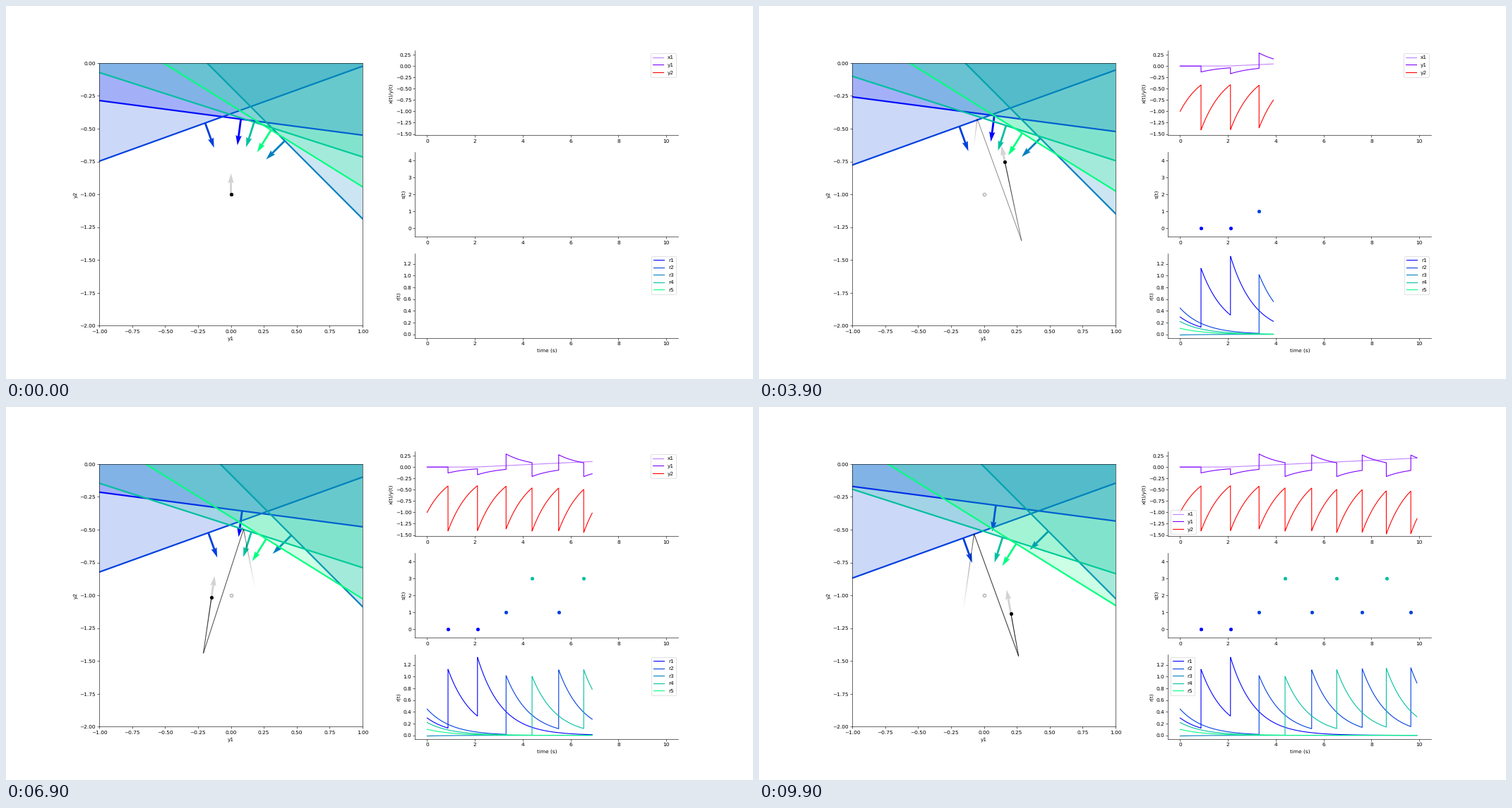
These frames come from a looping animation (1058x529 px, 10000 ms). A matplotlib script:

```python
import numpy as np
import matplotlib.pyplot as plt
from matplotlib.animation import FuncAnimation
from matplotlib.collections import LineCollection

plt.rcParams["font.family"] = "DejaVu Sans"
plt.rcParams["text.hinting"] = "none"

FRAMES, STEP = 100, 100            # simulation steps per frame
DT = 0.001
TRAIL, STRIDE = 1000, 10           # fading trail: one second of history
ANGLES = np.radians([-7.5, 19.85, -45.1, -17.8, -31.9])
D = np.array([np.sin(ANGLES), -np.cos(ANGLES)])    # decoder, one column per neuron
SIGNS = np.array([1, -1, 1, -1, -1])               # input weight of each neuron
THRESH = 1 / np.sqrt(3)
CENTER = np.array([0.0, -1.0])
COLORS = plt.cm.winter(np.linspace(0, 1, 5))
PURPLE, RED = plt.cm.rainbow([0.0, 1.0])


def distances(x):
    """Distance of every boundary from the centre for input x."""
    return THRESH * (1 + SIGNS * x)


def simulate():
    """Leaky network: a neuron fires when the output crosses its boundary."""
    n = FRAMES * STEP
    t = np.arange(n) * DT
    x = 0.2 * np.clip(t - 2, 0, None) / 8
    r = np.zeros((n, 5))
    r[0] = np.linalg.pinv(D) @ CENTER
    spikes = []
    decay = np.exp(-DT)
    for k in range(1, n):
        r[k] = r[k - 1] * decay
        excess = -(D.T @ (D @ r[k] - CENTER)) - distances(x[k])
        i = int(np.argmax(excess))
        if excess[i] > 0:
            r[k, i] += 1
            spikes.append((k, i))
    return t, x, r, r @ D.T, spikes


t, x, r, y, spikes = simulate()

fig = plt.figure(figsize=(20, 10), dpi=52.9)

# Output space
ax = fig.add_subplot(1, 2, 1)
ax.set_aspect("equal")
ax.set(xlabel="y1", ylabel="y2")

leak = ax.quiver([0], [-1], [0], [1], color="lightgray", scale=12.5, zorder=1.5)
edges, areas, arrows = [], [], []
for i, c in enumerate(COLORS):
    z = 2 + 0.08 * i
    edges.append(ax.plot([], [], color=c, lw=3, zorder=z)[0])
    arrows.append(ax.quiver([0], [0], [D[0, i]], [D[1, i]], color=[c],
                            scale=10, zorder=z + 0.02))
    areas.append(ax.fill([0, 1, 1], [0, 0, 1], color=c, alpha=0.2, lw=0,
                         zorder=z + 0.04)[0])
ax.plot(*CENTER, "o", mfc="white", mec="gray", mew=1, ms=6, zorder=3)
trail = LineCollection([], linewidths=1.5, zorder=4)
ax.add_collection(trail)
dot, = ax.plot([], [], "o", color="black", ms=6, zorder=5)
ax.set_xlim(-1, 1)
ax.set_ylim(-2, 0)


# Time courses
def time_axes(row, label, ylim):
    a = fig.add_subplot(3, 2, 2 * row)
    a.spines[["top", "right"]].set_visible(False)
    a.set(xlim=(-0.5, 10.5), ylim=ylim, ylabel=label)
    return a


ax_y = time_axes(1, "x(t)/y(t)", (-1.527, 0.338))
ax_s = time_axes(2, "s(t)", (-0.5, 4.5))
ax_r = time_axes(3, "r(t)", (-0.062, 1.375))
ax_r.set_xlabel("time (s)")

curves = [
    (ax_y.plot([], [], color=PURPLE, alpha=0.5, label="x1")[0], x),
    (ax_y.plot([], [], color=PURPLE, label="y1")[0], y[:, 0]),
    (ax_y.plot([], [], color=RED, label="y2")[0], y[:, 1]),
]
for i, c in enumerate(COLORS):
    curves.append((ax_r.plot([], [], color=c, label=f"r{i + 1}")[0], r[:, i]))
marks = [ax_s.plot([], [], "o", color=c, ms=6)[0] for c in COLORS]
ax_y.legend(loc="best")
ax_r.legend(loc="best")


def draw_boundaries(k):
    for i, d in enumerate(distances(x[k])):
        foot = CENTER - d * D[:, i]
        slope = -D[0, i] / D[1, i]
        xs = np.array([-1.2, 1.2])
        ys = foot[1] + slope * (xs - foot[0])
        edges[i].set_data(xs, ys)
        areas[i].set_xy([(xs[0], ys[0]), (xs[1], ys[1]), (1.2, 2), (-1.2, 2)])
        arrows[i].set_offsets([foot])


def draw_trail(k):
    idx = np.arange(max(0, k - TRAIL), k + 1, STRIDE)
    pts = y[idx]
    trail.set_segments(list(np.stack([pts[:-1], pts[1:]], axis=1)))
    rgba = np.zeros((len(idx) - 1, 4))
    rgba[:, 3] = 1 - (k - idx[1:]) / TRAIL
    trail.set_color(rgba)


def update(frame):
    k = frame * STEP
    draw_boundaries(k)
    draw_trail(k)
    dot.set_data([y[k, 0]], [y[k, 1]])
    leak.set_offsets([y[k]])
    leak.set_UVC([-y[k, 0]], [-y[k, 1]])
    for line, data in curves:
        line.set_data(t[:k + 1], data[:k + 1])
    for i, m in enumerate(marks):
        times = [t[s] for s, n in spikes if n == i and s <= k]
        m.set_data(times, [i] * len(times))
    return []


anim = FuncAnimation(fig, update, frames=FRAMES, interval=100,
                     repeat=True, repeat_delay=0, blit=False)
plt.show()
```
